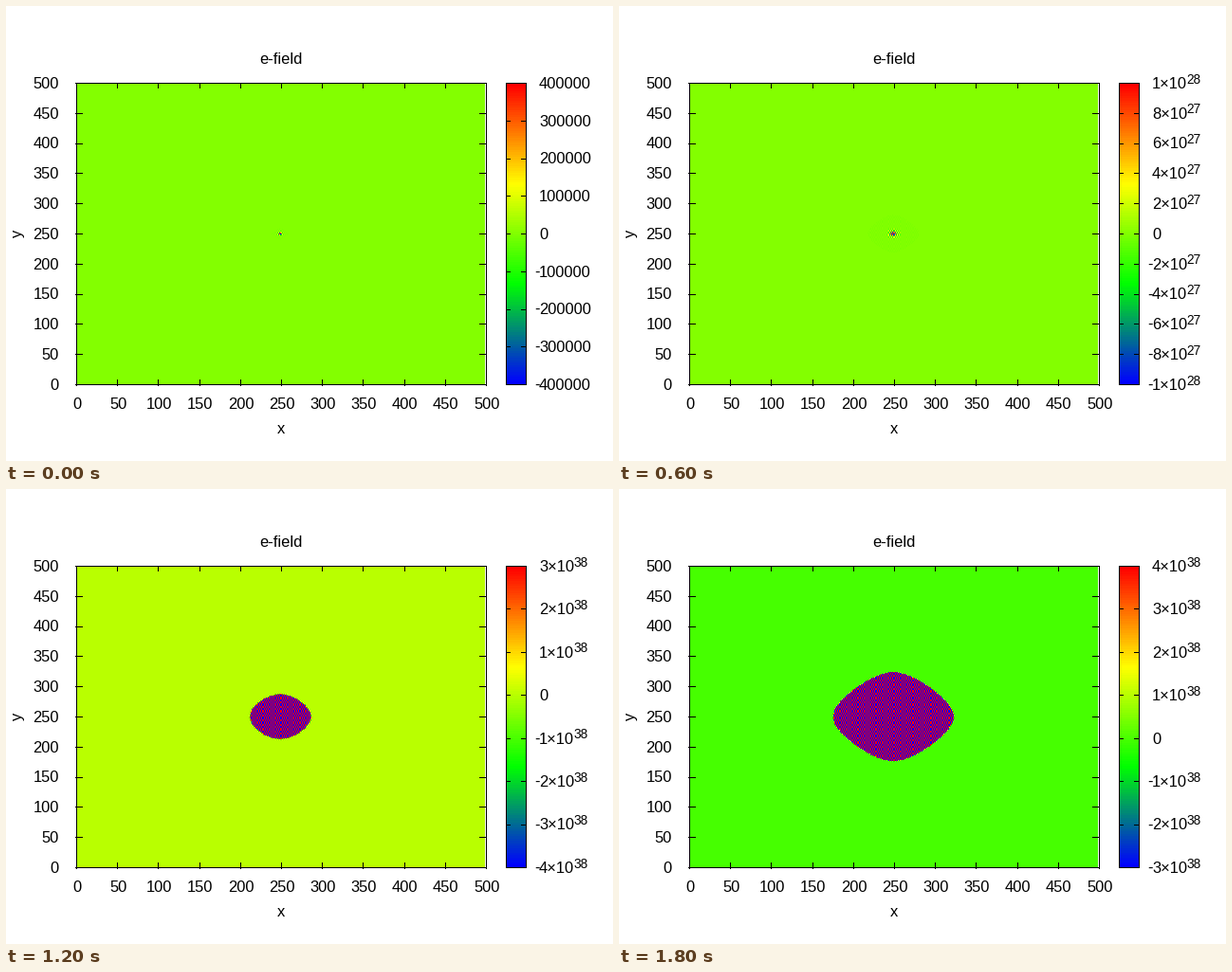
These frames come from a looping animation (640x480 px, 2 s). A matplotlib script:

```python
import numpy as np
import matplotlib.pyplot as plt
from matplotlib.animation import FuncAnimation

plt.rcParams["font.family"] = "Liberation Sans"
W, H, DPI = 640, 480, 100
PX = 72 / DPI
LEFT, RIGHT, TOP, BOTTOM = 74.5, 506.5, 81.5, 399.5
BAR_L, BAR_R = 527.5, 548.5
FONT = 16.45 * PX
FLOAT_MAX = 3.4e38

# Colour range per frame: lowest and highest tick, tick spacing, power of ten
RANGES = [
    (-4, 4, 1, 5), (-6, 5, 1, 12), (-3, 2.5, 0.5, 20), (-10, 10, 2, 27),
    (-4, 3, 1, 35), (-4, 4, 1, 38), (-4, 3, 1, 38), (-3, 4, 1, 38),
    (-3, 3, 1, 38), (-3, 4, 1, 38),
]


def palette(level, shades=128):
    """Blue, green, yellow, red in equal thirds, in a fixed number of shades."""
    level = np.minimum(np.floor(level * shades), shades - 1) / (shades - 1)
    stops = [0, 1 / 3, 2 / 3, 1]
    rgb = [np.interp(level, stops, c)
           for c in ([0, 0, 1, 1], [0, 1, 1, 0], [1, 0, 0, 0])]
    return np.round(255 * np.stack(rgb, axis=-1)).astype(np.uint8)


def simulate(count, steps=10, size=500, cx=248, cy=250):
    """Unstable leapfrog wave from one point; a snapshot every few steps."""
    prev = np.zeros((size, size))
    cur = prev.copy()
    cur[cy, cx] = -1
    shots = []
    for n in range(1, count * steps + 1):
        around = sum(np.roll(cur, s, axis) for s in (1, -1) for axis in (0, 1))
        prev, cur = cur, around - 2 * cur - prev
        if n % steps == 0:
            shots.append(cur)
    scale = 9e27 / abs(shots[3][cy, cx])
    fields = [shot * scale for shot in shots]
    return [np.where(abs(f) > FLOAT_MAX, np.sign(f) * np.inf, f) for f in fields]


fields = simulate(len(RANGES))
cols = ((np.arange(75, 505) + 0.5 - LEFT) / (RIGHT - LEFT) * 500).astype(int)
rows = ((BOTTOM - np.arange(82, 399) - 0.5) / (BOTTOM - TOP) * 500).astype(int)


def picture(i):
    lo, hi, _, power = RANGES[i]
    lo, hi = lo * 10.0 ** power, hi * 10.0 ** power
    values = np.clip(fields[i][np.ix_(rows, cols)], lo, hi)
    return palette((values - lo) / (hi - lo))


fig = plt.figure(figsize=(W / DPI, H / DPI), dpi=DPI, facecolor="white")
field_img = fig.figimage(picture(0), 75, H - 399, origin="upper")
bar = np.repeat(palette(np.linspace(1, 0, 317))[:, None], 20, axis=1)
fig.figimage(bar, 528, H - 399, origin="upper")

ax = fig.add_axes([0, 0, 1, 1], zorder=1)
ax.set(xlim=(0, W), ylim=(H, 0))
ax.axis("off")


def line(xs, ys):
    """Black one-pixel line through pixel centres."""
    xs, ys = np.floor(xs) + 0.5, np.floor(ys) + 0.5
    return ax.plot(xs, ys, color="black", lw=PX, snap=False,
                   solid_capstyle="projecting", solid_joinstyle="miter")[0]


def label(x, y, s, ha="center", **kw):
    return ax.text(x, y, s, ha=ha, va="baseline", size=FONT, color="black", **kw)


def box(left, right):
    line([left, right, right, left, left], [TOP, TOP, BOTTOM, BOTTOM, TOP])


box(LEFT, RIGHT)
box(BAR_L, BAR_R)
for v in range(0, 501, 50):
    x = LEFT + (RIGHT - LEFT) * v / 500
    y = BOTTOM - (BOTTOM - TOP) * v / 500
    line([x, x], [BOTTOM - 5, BOTTOM + 1])
    line([x, x], [TOP, TOP + 5])
    line([LEFT - 1, LEFT + 6], [y, y])
    line([RIGHT - 7, RIGHT], [y, y])
    label(x + 0.4, 425, str(v))
    label(55.7, y + 5.3, str(v), ha="right")
label(290, 61, "e-field")
label(290, 451, "x")
label(20, 239.5, "y", rotation=90).set(ha="right", va="center")

bar_parts = []


def bar_label(y, value):
    base = y + 5.3
    if value < 0:
        bar_parts.append(label(562.5, base, "-", ha="right"))
    size = abs(value)
    if size < 1e6:
        bar_parts.append(label(562, base, f"{size:.0f}", ha="left"))
        return
    mantissa, power = f"{size:.1e}".split("e")
    body = label(562, base, f"{float(mantissa):g}×10", ha="left")
    sup = ax.annotate(str(int(power)), xy=(1, base - 5.3),
                      xycoords=(body, ax.transData), xytext=(-0.8 * PX, 0),
                      textcoords="offset points", size=FONT * 0.83,
                      ha="left", va="baseline", annotation_clip=False)
    bar_parts.extend([body, sup])


def draw(i):
    field_img.set_data(picture(i))
    while bar_parts:
        bar_parts.pop().remove()
    lo, hi, step, power = RANGES[i]
    count = round((hi - lo) / step)
    for k in range(count + 1):
        y = BOTTOM - (BOTTOM - TOP) * k / count
        bar_parts.append(line([BAR_L, BAR_L + 4], [y, y]))
        bar_parts.append(line([BAR_R - 5, BAR_R], [y, y]))
        bar_label(y, (lo + k * step) * 10.0 ** power)
    return []


anim = FuncAnimation(fig, draw, frames=len(RANGES), interval=200,
                     init_func=lambda: [], repeat=True, repeat_delay=0, blit=False)
plt.show()
```
